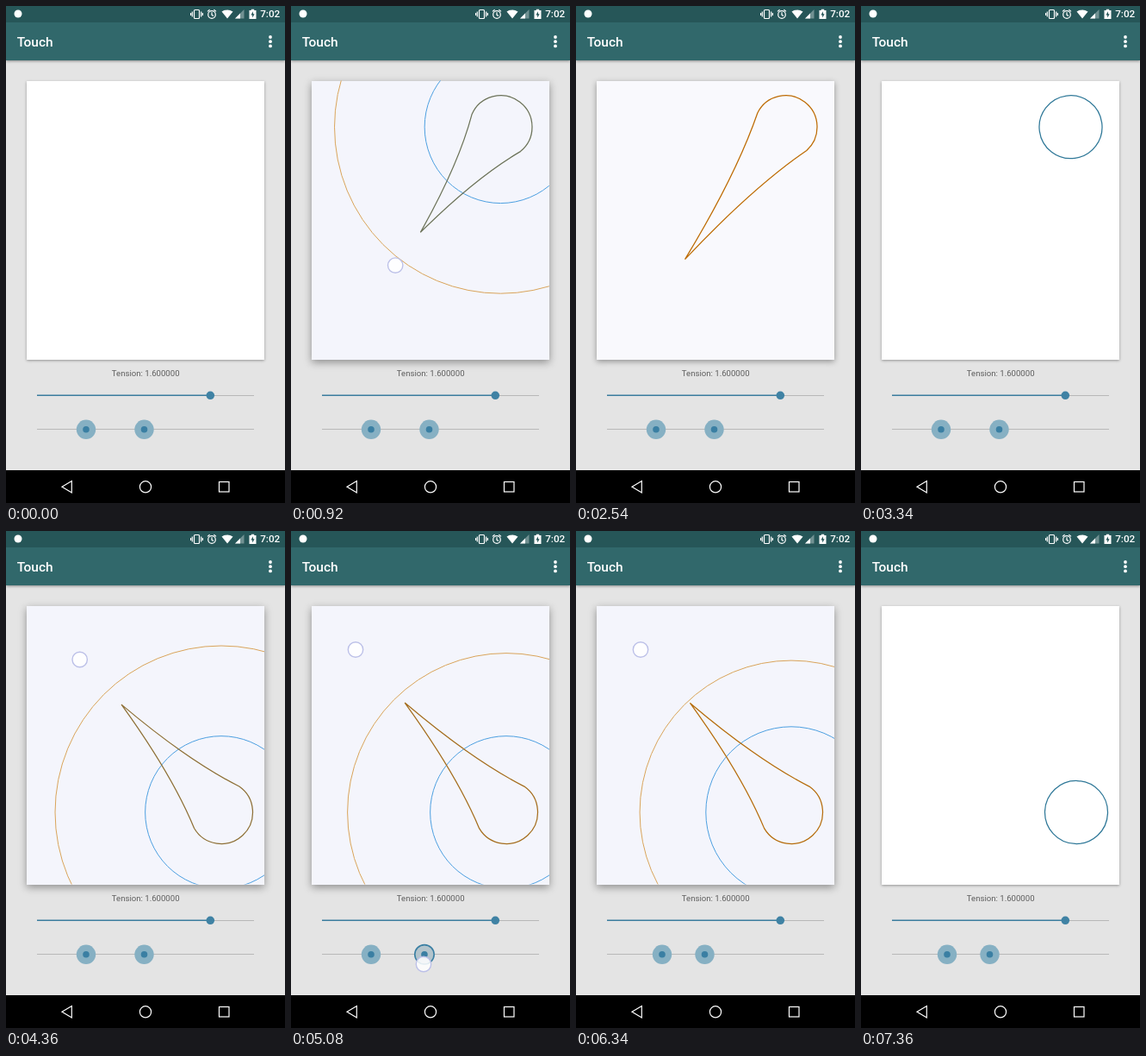
An HTML page that plays this animation: 324 by 576 pixels, repeating every 7.38 s.

```html
<!DOCTYPE html>
<html lang="en">
<head>
<meta charset="utf-8">
<title>Touch</title>
<style>
  html, body { margin: 0; width: 100%; height: 100%; overflow: hidden; background: #e4e4e4; }
  #panel, svg { position: absolute; }
  #panel { left: 24px; top: 86.5px; width: 276px; height: 323px; }
  svg { left: 0; top: 0; }
  text { font-family: Roboto, sans-serif; }
  .bar { box-shadow: 0 1px 3px rgba(0, 0, 0, .4); position: absolute; width: 324px; height: 63px; }
  .line { fill: none; stroke-width: 1; }
  .icon { fill: none; stroke: #fff; stroke-width: 1.2; }
  .finger { fill: #fff; fill-opacity: .85; stroke: #bcc0e8; stroke-width: 1.4; }
  .dot { fill: #3a7fa3; }
</style>
</head>
<body>
<div class="bar"></div>
<div id="panel"></div>
<svg width="324" height="576" viewBox="0 0 324 576">
  <clipPath id="clip"><rect x="24" y="86.5" width="276" height="323"/></clipPath>

  <rect width="324" height="63" fill="#31686b"/>
  <rect width="324" height="19" fill="#265658"/>
  <circle cx="14" cy="9" r="4.5" fill="#fff"/>
  <g class="icon">
    <rect x="218.5" y="4.5" width="6" height="10" rx="1"/>
    <path d="M216.3 6.5v6M226.7 6.5v6M214.6 8v3M228.4 8v3"/>
    <circle cx="239" cy="10" r="4.3"/>
    <path d="M239 7.3v3l2 1.2M234 6.4l2.6-2.2M244 6.4l-2.6-2.2"/>
  </g>
  <path d="M250.5 6.5Q257 2.5 263.5 6.5L257 14.5Z" fill="#fff"/>
  <path d="M276.5 4v10.5H266Z" fill="#fff" opacity=".35"/>
  <path d="M272 8.5v6H266Z" fill="#fff"/>
  <path d="M282.5 5h2.3V3.8h3.4V5h2.3v10h-8Z" fill="#fff"/>
  <path d="M287 6.2l-2.6 4.2h1.7v3.2l2.6-4.4H287Z" fill="#265658"/>
  <text x="295.2" y="13.4" font-size="11.7" font-weight="500" fill="#fff">7:02</text>
  <text x="12.7" y="47.3" font-size="15.5" font-weight="500" fill="#fff">Touch</text>
  <g fill="#fff">
    <circle cx="307" cy="36" r="1.9"/><circle cx="307" cy="41.2" r="1.9"/><circle cx="307" cy="46.4" r="1.9"/>
  </g>

  <g clip-path="url(#clip)">
    <g id="rings">
      <circle id="outer" class="line" stroke="#d9a45a"/>
      <circle id="inner" class="line" stroke="#4c9fe0"/>
    </g>
    <path id="blob" fill="none" stroke-width="1.25"/>
  </g>

  <text x="162.2" y="429.2" font-size="9.6" text-anchor="middle" fill="#5e5e5e">Tension: 1.600000</text>
  <path d="M36 451.5H288M36 490.5H288" stroke="#b8b8b8"/>
  <path d="M36 451.3H237" stroke="#3a7d9e" stroke-width="1.6"/>
  <circle cx="237.3" cy="451.3" r="4.8" fill="#3f82a4"/>
  <g id="low"><circle class="halo" r="11.2"/><circle class="dot" r="3.8"/></g>
  <g id="high"><circle class="halo" r="11.2"/><circle class="dot" r="3.8"/></g>

  <rect y="538" width="324" height="38"/>
  <g class="icon" stroke-width="1.5">
    <path d="M65 557.3L76.3 550.6V564Z"/>
    <circle cx="162" cy="557.3" r="6.6"/>
    <rect x="247.5" y="551.5" width="11.5" height="11.5"/>
  </g>
  <circle id="drag" class="finger" r="8.7"/>
  <circle id="tune" class="finger" r="8.7"/>
</svg>
<script>
const LOOP = 7380, R = 36.5, LEFT = 36, SCALE = 1.55;
const BLUE = [47, 120, 152], ORANGE = [190, 108, 4];
const TENSION = 1.63, REACH = 2.4, SNAP_DELAY = 100, SNAP = 480;

const strokes = [
  { down: 200, moveFrom: 250, moveTo: 1440, up: 2500, x: 243.5, y: 140.2, dx: -204, dy: 267.5 },
  { down: 3460, moveFrom: 3520, moveTo: 4520, up: 6560, x: 250, y: 326, dx: -175, dy: -188.5 }
];
const tunes = [
  { id: 'high', down: 4720, from: 4800, to: 5360, up: 5440, a: 160.5, b: 149.5, y: 502 },
  { id: 'low', down: 5560, from: 5640, to: 6060, up: 6140, a: 93, b: 100, y: 501 }
];

const el = id => document.getElementById(id);
const clamp = v => Math.max(0, Math.min(1, v));
const mix = (a, b, k) => a + (b - a) * k;
const ramp = (t, a, b) => clamp((t - a) / (b - a));
const ease = (t, a, b) => (1 - Math.cos(Math.PI * ramp(t, a, b))) / 2;
const set = (node, attrs) => { for (const k in attrs) node.setAttribute(k, attrs[k]); };
const show = (node, on) => node.setAttribute('visibility', on ? 'visible' : 'hidden');

// Teardrop in local axes: the tip lies on +x
function teardrop(d) {
  if (d <= R + .5) return `M${R} 0A${R} ${R} 0 1 1 ${-R} 0A${R} ${R} 0 1 1 ${R} 0Z`;
  const a = Math.acos(R / d), px = R * Math.cos(a), py = R * Math.sin(a);
  const bow = 12 * (1 - R / d), len = Math.hypot(d - px, py);
  const cx = mix(px, d, .4) - bow * py / len, cy = py * .6 - bow * (d - px) / len;
  return `M${d} 0Q${cx} ${cy} ${px} ${py}A${R} ${R} 0 1 1 ${px} ${-py}Q${cx} ${-cy} ${d} 0Z`;
}

function stretch(dist, inner, outer) {
  if (dist <= inner) return { d: dist, k: 0 };
  const k = clamp((dist - inner) / (outer - inner) / REACH);
  return { d: inner + (outer - inner) * (1 - Math.pow(1 - k, TENSION)), k: k * k * (3 - 2 * k) };
}

function drawSliders(t) {
  const pos = {};
  show(el('tune'), false);
  for (const s of tunes) {
    const x = pos[s.id] = mix(s.a, s.b, ease(t, s.from, s.to));
    const held = t >= s.down && t < s.up;
    const thumb = el(s.id);
    set(thumb, { transform: `translate(${x} 490.8)` });
    set(thumb.firstChild, held
      ? { fill: '#b3c4cc', stroke: '#3a7fa3', 'stroke-width': 1.6 }
      : { fill: '#86b0c3', stroke: 'none' });
    if (held) {
      show(el('tune'), true);
      set(el('tune'), { cx: x - 1, cy: s.y });
    }
  }
  return { inner: (pos.low - LEFT) * SCALE, outer: (pos.high - LEFT) * SCALE };
}

function drawPanel(t, s) {
  const lift = s ? ramp(t, s.down, s.down + 100) - ramp(t, s.up, s.up + 100) : 0;
  const panel = el('panel').style;
  panel.background = `rgb(${mix(255, 244, lift)},${mix(255, 245, lift)},${mix(255, 252, lift)})`;
  panel.boxShadow = `0 ${mix(1, 3, lift)}px ${mix(3, 9, lift)}px rgba(0,0,0,${mix(.36, .38, lift)})`;
}

function draw(t) {
  const { inner, outer } = drawSliders(t);
  const s = strokes.filter(p => t >= p.down).pop();
  const held = !!s && t < s.up;
  drawPanel(t, s);
  show(el('rings'), held);
  show(el('drag'), held);
  show(el('blob'), !!s);
  if (!s) return;

  const go = ease(t, s.moveFrom, s.moveTo);
  const tip = stretch(go * Math.hypot(s.dx, s.dy), inner, outer);
  const start = s.up + SNAP_DELAY;
  const rest = 1 - ease(t, start, start + SNAP);
  const k = tip.k * rest;
  set(el('blob'), {
    d: teardrop(tip.d * rest),
    transform: `translate(${s.x} ${s.y}) rotate(${Math.atan2(s.dy, s.dx) * 180 / Math.PI})`,
    stroke: `rgb(${BLUE.map((c, i) => Math.round(mix(c, ORANGE[i], k)))})`
  });
  set(el('inner'), { cx: s.x, cy: s.y, r: inner });
  set(el('outer'), { cx: s.x, cy: s.y, r: outer });
  set(el('drag'), { cx: s.x + s.dx * go, cy: s.y + s.dy * go });
}

const begin = performance.now();
function tick() {
  draw((performance.now() - begin) % LOOP);
  requestAnimationFrame(tick);
}
tick();
</script>
</body>
</html>
```
